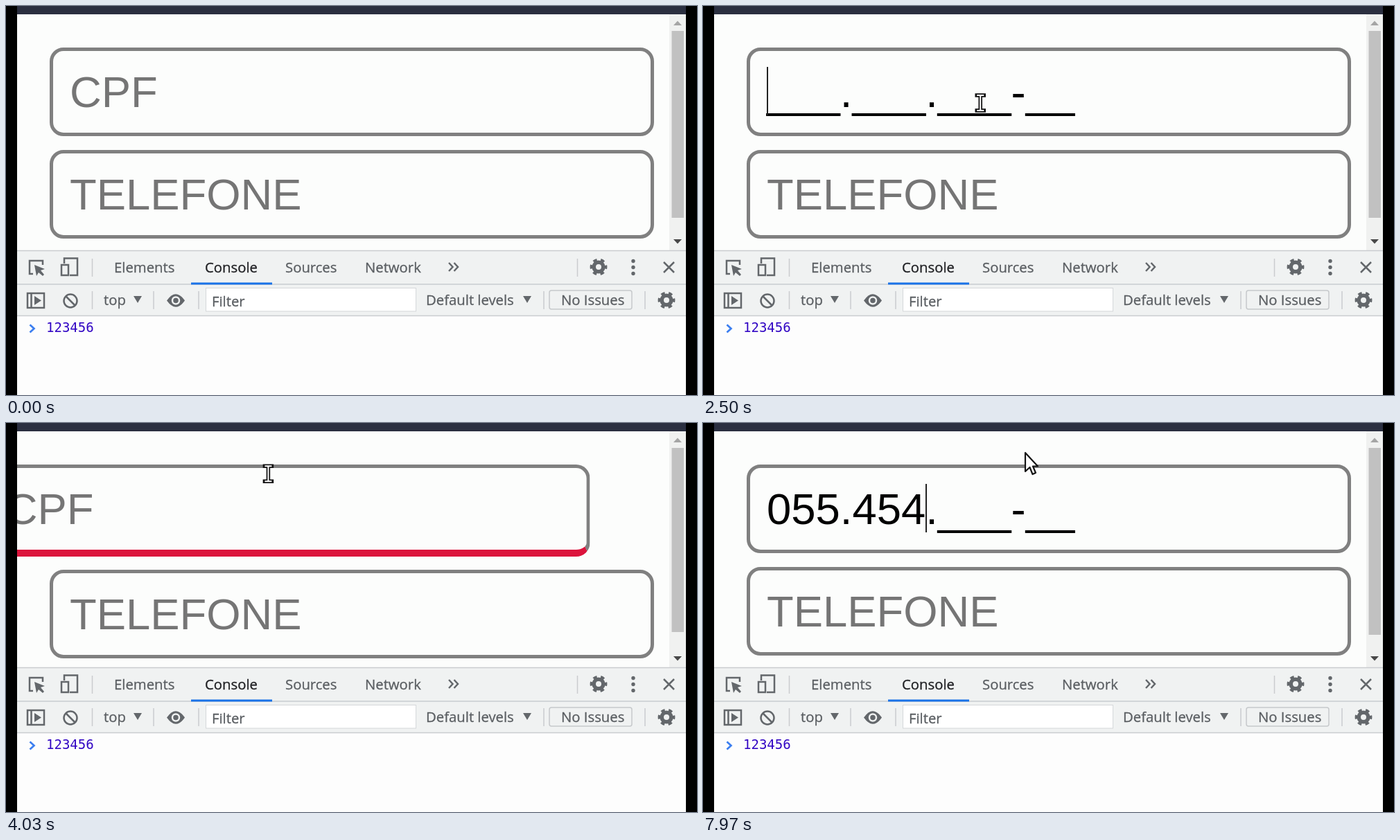
An HTML page that plays this animation: 997x562 px, repeating every 8000 ms.

```html
<!DOCTYPE html>
<html lang="pt">
<head>
<meta charset="utf-8">
<title>Input mask</title>
<style>
html, body { margin: 0; width: 100%; height: 100%; overflow: hidden; background: #000; }
#stage { position: relative; width: 997px; height: 562px; overflow: hidden; background: #000; }
#page { position: absolute; left: 16px; top: 12px; width: 941px; height: 341px; overflow: hidden; background: #fcfdfc; }
.field {
  position: absolute; left: 47px; width: 838px; height: 118px; padding-left: 24px;
  border: 5px solid #808080; border-radius: 20px; background: #fcfdfc;
  font: 63.4px/118px "Liberation Sans", Arial, sans-serif; white-space: pre; color: #757575;
}
#cpf { top: 48px; }
#phone { top: 195.5px; }
.masked { color: #000; }
.error #cpf { border-bottom: 10px solid #dc143c; }
.error #phone { top: 200px; }
#caret { position: absolute; top: 23px; width: 1.5px; height: 70px; background: #222; }
svg { position: absolute; left: 0; top: 0; }
.ui { font: 20.3px "Open Sans", "Noto Sans", sans-serif; fill: #5a5e62; stroke: #5a5e62; stroke-width: .3; }
.ui .active { fill: #202124; stroke: #202124; }
.icon { fill: none; stroke: #63676b; stroke-width: 2.5; }
.solid { fill: #63676b; }
.rule { stroke: #c9cccf; stroke-width: 1.5; }
</style>
</head>
<body>
<div id="stage">
  <div id="page">
    <div class="field" id="cpf"><span id="typed"></span><i id="caret"></i><span id="rest"></span></div>
    <div class="field" id="phone">TELEFONE</div>
  </div>
  <svg width="997" height="562" viewBox="0 0 997 562">
    <defs>
      <g id="gear" fill="none" stroke="#63676b">
        <circle r="6.8" stroke-width="5.6"/>
        <circle r="10.3" stroke-width="4.2" stroke-dasharray="5.4 5.386" stroke-dashoffset="2.7"/>
      </g>
      <path id="down" d="M-6 -5H6L0 5Z"/>
    </defs>
    <rect x="16" width="965" height="12" fill="#2b2f40"/>

    <!-- scrollbar -->
    <rect x="957" y="12" width="24" height="341" fill="#f0f1f0"/>
    <rect id="thumb" x="960.5" y="36" width="17.5" height="270" fill="#c1c1c1"/>
    <path d="M963 28H975L969 21.500Z" fill="#a5a5a5"/>
    <path d="M963 337H975L969 343.500Z" fill="#484848"/>

    <!-- developer tools -->
    <rect x="16" y="353" width="965" height="95" fill="#f0f2f2"/>
    <rect x="16" y="448" width="965" height="114" fill="#fdfdfd"/>
    <path class="rule" d="M16 353.500H981M16 402H981M16 447.500H981M124.500 365V391M824.500 365V391M124.500 412V438M213 412V438M278 412V438M776 412V438M922 412V438"/>
    <rect x="267" y="399.500" width="117" height="3" fill="#1a73e8"/>

    <path class="icon" d="M39 387H34V368H53V374"/>
    <path class="solid" d="M41 374L56 380L50 382L55 388L53 390L47 385L44 390Z"/>
    <path class="icon" d="M84 372V364.500H103V389H92M80 374H90V389H80Z"/>
    <g class="ui">
      <text x="156" y="385">Elements</text>
      <text class="active" x="287" y="385">Console</text>
      <text x="403" y="385">Sources</text>
      <text x="518" y="385">Network</text>
      <text x="141" y="432">top</text>
      <text x="606" y="432">Default levels</text>
      <text x="801" y="432">No Issues</text>
    </g>
    <path class="icon" d="M639 371L644.500 377L639 383M646.500 371L652 377L646.500 383"/>
    <use href="#gear" x="855" y="377"/>
    <g class="solid"><circle cx="905" cy="368.500" r="2.700"/><circle cx="905" cy="377.500" r="2.700"/><circle cx="905" cy="386.500" r="2.700"/></g>
    <path class="icon" d="M949 370L964 385M964 370L949 385"/>

    <path class="icon" d="M31 415H55V436H31ZM36.500 415V436"/>
    <path class="solid" d="M41 419L51 425.500L41 432Z"/>
    <circle class="icon" cx="93" cy="426" r="9.500"/>
    <path class="icon" d="M86.500 419.500L99.500 432.500"/>
    <use href="#down" class="solid" x="190" y="424"/>
    <path class="solid" d="M232 425.500Q245 407 258 425.500Q245 444 232 425.500Z"/>
    <circle cx="245" cy="425.500" r="5" fill="#63676b" stroke="#f0f2f2" stroke-width="2.500"/>
    <rect x="288.500" y="407.500" width="303" height="33.500" fill="#fff" stroke="#d5d8da"/>
    <text class="ui" x="297" y="433.500">Filter</text>
    <use href="#down" class="solid" x="752" y="424"/>
    <rect x="784" y="411" width="119" height="27" rx="3" fill="none" stroke="#c6c9cb" stroke-width="1.500"/>
    <use href="#gear" x="953" y="425"/>

    <path d="M34.500 460.500L40.500 466L34.500 471.500" fill="none" stroke="#3b7ef0" stroke-width="2.700"/>
    <text x="58" y="471" fill="#3206c4" font-size="19" font-family="'DejaVu Sans Mono', monospace">123456</text>

    <!-- pointer -->
    <path id="arrow" d="M1 1V28L7.500 22L11.500 32L16 30L12 20.500H19Z" fill="#fff" stroke="#151515" stroke-width="2.200" stroke-linejoin="round"/>
    <g id="beam" fill="none">
      <path d="M-5 -11H5M0 -11V11M-5 11H5" stroke="#111" stroke-width="5.500" stroke-linecap="square"/>
      <path d="M-5 -11H5M0 -11V11M-5 11H5" stroke="#fff" stroke-width="2"/>
    </g>
  </svg>
</div>
<script>
const LOOP = 8000;
const MASK = "___.___.___-__";
const VALUE = "055.454";
const KEYS = [[5350, 1], [5600, 2], [5930, 3], [6200, 5], [6450, 6], [6720, 7]];
const SHAKE = { start: 2933, period: 393, cycles: 3, reach: 96 };
const SHAKE_END = SHAKE.start + SHAKE.period * SHAKE.cycles;

// pointer stops: time, x, y
const STOPS = [
  [1000, 800, 440], [1480, 767, 215], [1650, 767, 215], [1950, 420, 145],
  [2540, 400, 140], [2850, 317, 30], [3750, 317, 30], [4150, 395, 85],
  [4550, 453, 139], [7530, 453, 139], [7880, 464, 42]
];

const el = id => document.getElementById(id);
const between = (t, from, to) => t >= from && t < to;
const smooth = p => p * p * (3 - 2 * p);

function pointerAt(t) {
  const next = STOPS.findIndex(stop => stop[0] > t);
  if (next < 0) return STOPS[STOPS.length - 1].slice(1);
  if (next === 0) return null;
  const [t0, x0, y0] = STOPS[next - 1];
  const [t1, x1, y1] = STOPS[next];
  const p = smooth((t - t0) / (t1 - t0));
  return [x0 + (x1 - x0) * p, y0 + (y1 - y0) * p];
}

function drawPointer(t) {
  const at = pointerAt(t);
  const overField = at && at[0] > 63 && at[0] < 935 &&
    (between(at[1], 60, 188) || between(at[1], 207, 336));
  for (const [id, shown] of [["arrow", at && !overField], ["beam", overField]]) {
    el(id).style.display = shown ? "" : "none";
    if (shown) el(id).setAttribute("transform", `translate(${at})`);
  }
}

function drawField(t) {
  const masked = between(t, 1830, SHAKE.start) || t >= 4150;
  const focusedAt = between(t, 2050, SHAKE.start) ? 2050 : t >= 5050 ? 5050 : null;
  const [keyTime, count] = KEYS.filter(key => key[0] <= t).pop() || [focusedAt, 0];
  el("cpf").classList.toggle("masked", masked);
  el("typed").textContent = VALUE.slice(0, count);
  el("rest").textContent = masked ? MASK.slice(count) : "CPF";
  const caretOn = focusedAt !== null && (t - keyTime) % 1000 < 500;
  el("caret").style.visibility = caretOn ? "visible" : "hidden";
}

function drawShake(t) {
  const error = between(t, SHAKE.start, SHAKE_END);
  const turn = (t - SHAKE.start) / SHAKE.period * 2 * Math.PI;
  el("stage").classList.toggle("error", error);
  el("cpf").style.transform = error ? `translateX(${SHAKE.reach * Math.sin(turn)}px)` : "none";
  el("thumb").setAttribute("height", error ? 266 : 270);
}

const begin = performance.now();
function draw(now) {
  const t = Math.max(0, now - begin) % LOOP;
  drawField(t);
  drawShake(t);
  drawPointer(t);
  requestAnimationFrame(draw);
}
draw(begin);
</script>
</body>
</html>
```
